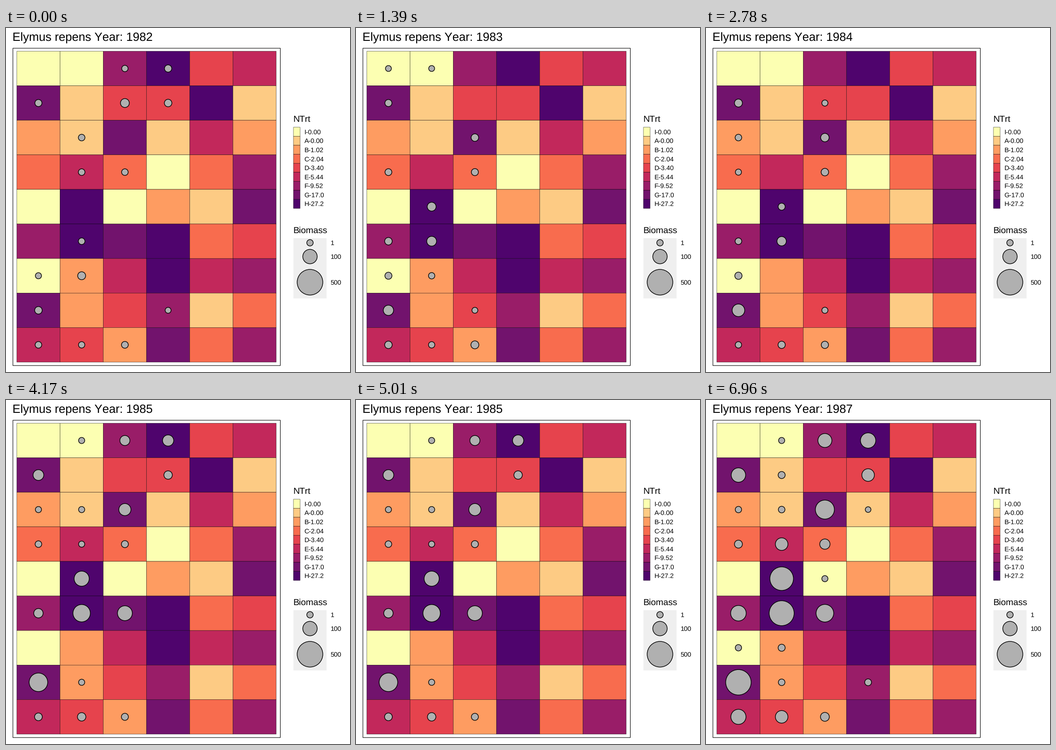
Animation of 748 by 748 pixels, one loop 8 s. Source, as a matplotlib script:

```python
import matplotlib.pyplot as plt
from matplotlib.animation import FuncAnimation
from matplotlib.collections import PatchCollection
from matplotlib.patches import Rectangle

SIZE = 748
DPI = 64
PT = 72 / DPI  # points per pixel
STEP = 20
LOOP = 8000

plt.rcParams["font.family"] = "Liberation Sans"
plt.rcParams["text.hinting"] = "none"
plt.rcParams["text.kerning_factor"] = 6  # plain advances, no pair kerning

LEVELS = {
    "I-0.00": "#fcffb2",
    "A-0.00": "#fdcb84",
    "B-1.02": "#fe9c61",
    "C-2.04": "#f86c4e",
    "D-3.40": "#e6434d",
    "E-5.44": "#c2285b",
    "F-9.52": "#991d68",
    "G-17.0": "#72136d",
    "H-27.2": "#4f046d",
}
COLOR = {label[0]: color for label, color in LEVELS.items()}

FIELD = ["IIFHDE", "GADDHA", "BAGAEB", "CECICF", "IHIBAG",
         "FHGHCD", "IBEHEF", "GBDFAC", "EDBGCF"]
LEFT, TOP = 23.5, 50.5
CELL_W, CELL_H = 94, 676 / 9
RIM = 1.4

# Bubble diameter in pixels, keyed by column letter and row number
BUBBLES = {
    1982: dict(c1=14.5, d1=16.5, a2=16, c2=20, d2=17, b3=15, b4=15, c4=15,
               b6=15, a7=14, b7=18, a8=17, d8=13.5, a9=15, b9=14.5, c9=15.5),
    1983: dict(a1=13.5, b1=13.5, a2=16, c3=17, a4=15.5, c4=16, b5=20, a6=17,
               b6=22, a7=16, b7=14.5, a8=23, c8=13.5, a9=17, b9=14.5, c9=18),
    1984: dict(a2=18, c2=14, a3=15, c3=19, a4=14, c4=17, b5=16, a6=15,
               b6=21, a7=16.5, a8=28, c8=14, a9=14.5, b9=16.5, c9=16.5),
    1985: dict(b1=14, c1=22.5, d1=25, a2=24, d2=19, a3=14, b3=14, c3=27,
               a4=15, b4=14, c4=16, b5=33.5, a6=21, b6=38.5, c6=33, a8=41,
               b8=14, a9=17.5, b9=19, c9=16),
    1986: dict(b1=14, d1=17, a2=36.5, d2=27, b3=14, c3=42, c4=22, b5=42,
               a6=22.5, b6=43, c6=19.5, a7=13, b7=15, e7=14, a8=35, c8=15,
               a9=29, b9=22.5, c9=20, d9=13),
    1987: dict(b1=14, c1=31, d1=34, a2=32, b2=16, d2=28, a3=14.5, b3=15,
               c3=42, d3=13, a4=18, b4=28, c4=23, b5=52, c5=14, a6=34.5,
               b6=55, c6=39, a7=14.5, b7=16, a8=56, b8=15, d8=15.5, a9=33.5,
               b9=28, c9=20),
}
STARTS = [0, 1390, 2780, 4170, 5570, 6960]

fig = plt.figure(figsize=(SIZE / DPI, SIZE / DPI), dpi=DPI, facecolor="white")
ax = fig.add_axes([0, 0, 1, 1])
ax.set_xlim(0, SIZE)
ax.set_ylim(SIZE, 0)
ax.axis("off")


def write(x, baseline, text, px):
    return ax.text(x, baseline, text, fontsize=px * PT, color="black",
                   va="baseline")


def tiles(boxes, colors, line):
    # Snapping would push edges on pixel centres one pixel away
    ax.add_collection(PatchCollection(
        [Rectangle(box[:2], *box[2:]) for box in boxes], snap=False,
        facecolors=colors, edgecolors="black", linewidths=line * PT))


def areas(diameters):
    return [((d - RIM / 2) * PT) ** 2 for d in diameters]


def bubbles(xs, ys, diameters):
    return ax.scatter(xs, ys, s=areas(diameters), c="#b0b0b0",
                      edgecolors="black", linewidths=RIM * PT)


def center(key):
    col, row = "abcdef".index(key[0]), int(key[1]) - 1
    return LEFT + CELL_W * (col + 0.5), TOP + CELL_H * (row + 0.5)


# Field map
tiles([(14.5, 43.5, 581.5, 690)], ["white"], 1.1)
tiles([(LEFT + CELL_W * c, TOP + CELL_H * r, CELL_W, CELL_H)
       for r in range(9) for c in range(6)],
      [COLOR[k] for k in "".join(FIELD)], 0.5)

# Treatment legend
KEY_H = 19.6
write(624.5, 204.3, "NTrt", 19.4)
tiles([(625, 215.8 + KEY_H * i, 14.5, KEY_H) for i in range(9)],
      list(LEVELS.values()), 0.5)
for i, label in enumerate(LEVELS):
    write(648.5, 230.6 + KEY_H * i, label, 14.2)

# Size legend
write(624.5, 446.3, "Biomass", 19.4)
ax.add_patch(Rectangle((625, 457), 72, 131, facecolor="#efefef", linewidth=0))
key_y = [467, 497, 552.8]
bubbles([661] * 3, key_y, [14.6, 32, 56.4])
for y, label in zip(key_y, ["1", "100", "500"]):
    write(705.8, y + 5.2, label, 14.2)

title = write(14, 28.3, "", 25.9)
dots = bubbles([0], [0], [14])


def draw(i):
    t = i * STEP + STEP / 2
    year = 1981 + sum(t >= start for start in STARTS)
    plots = BUBBLES[year]
    title.set_text(f"Elymus repens Year: {year}")
    dots.set_offsets([center(key) for key in plots])
    dots.set_sizes(areas(plots.values()))
    return title, dots


anim = FuncAnimation(fig, draw, frames=LOOP // STEP, interval=STEP,
                     repeat=True, repeat_delay=0)
plt.show()
```
